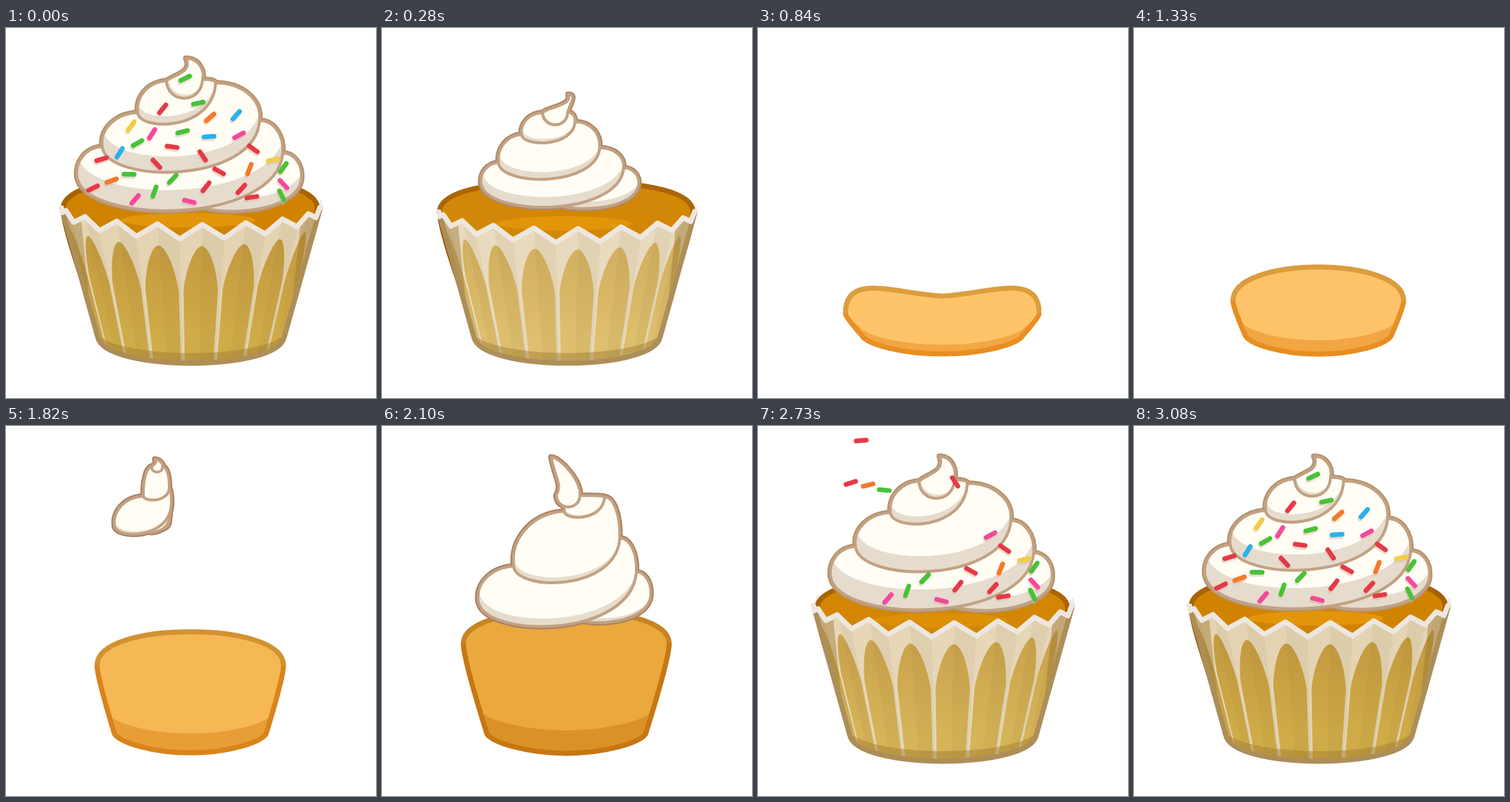
Animation of 512 by 512 pixels, one loop 3.15 s. Source, as an HTML page with a canvas:

```html
<!DOCTYPE html>
<html lang="en">
<head>
<meta charset="utf-8">
<title>Cupcake</title>
<style>
html, body { margin: 0; width: 100%; height: 100%; overflow: hidden; background: #fff; }
canvas { display: block; width: 100vmin; height: 100vmin; }
</style>
</head>
<body>
<canvas id="stage" width="512" height="512"></canvas>
<script>
const g = document.getElementById('stage').getContext('2d');
const LOOP = 3150, STEP = 70;
const FLAT = 840; // the cake has collapsed

const lerp = (a, b, k) => a + (b - a) * k;
const clamp = k => Math.max(0, Math.min(1, k));
const smooth = k => (k = clamp(k), k * k * (3 - 2 * k));
const easeOut = k => 1 - (1 - clamp(k)) ** 2;
const random = n => { const v = Math.sin(n * 12.9898) * 43758.5453; return v - Math.floor(v); };

function mix(a, b, k) {
  const ch = (c, i) => parseInt(c.slice(1 + 2 * i, 3 + 2 * i), 16);
  return 'rgb(' + [0, 1, 2].map(i => Math.round(lerp(ch(a, i), ch(b, i), k))).join() + ')';
}

/* ---------- motion of the cake ---------- */
// 1 is full size, 0 is flat dough
const rise = t => t < FLAT ? 1 - clamp(t / 800) ** 3.3 : smooth((t - 900) / 2000);

// jelly wobble: -1 tall and narrow, 1 wide and dented
const wobble = t => Math.cos(Math.PI * (t - FLAT) / 350) *
  (t < FLAT ? Math.min(1, t / 490) : Math.exp((FLAT - t) / 250));

/* ---------- cake ---------- */
function cakeShape(t) {
  const r = rise(t), q = wobble(t), sy = 395 - 145 * r;
  return {
    cx: 255, sy,
    tw: 118 + 58 * r * r + 16 * q,
    c1: sy - 32 - 25 * q * q,
    c2: sy - 46 + 18 * q,
    ty: sy - 46 + 22 * q,
    bw: 101 + 21 * r * r + 10 * q,
    by: 426, bc: 451 + 3 * r
  };
}

function cakePath({ cx, sy, tw, c1, c2, ty, bw, by, bc }) {
  const side = bw + (tw - bw) * .3, sideY = lerp(sy, by, .75), bend = sy + (by - sy) * .15;
  g.beginPath();
  g.moveTo(cx - tw, sy);
  g.bezierCurveTo(cx - tw, c1, cx - tw / 2, c2, cx, ty);
  g.bezierCurveTo(cx + tw / 2, c2, cx + tw, c1, cx + tw, sy);
  g.bezierCurveTo(cx + tw, bend, cx + side, sideY, cx + bw, by);
  g.bezierCurveTo(cx + bw - 8, by + 12, cx + bw / 2, bc, cx, bc);
  g.bezierCurveTo(cx - bw / 2, bc, cx - bw + 8, by + 12, cx - bw, by);
  g.bezierCurveTo(cx - side, sideY, cx - tw, bend, cx - tw, sy);
  g.closePath();
}

function drawCake(t) {
  const s = cakeShape(t), bake = rise(t) ** 2, band = (s.bc - s.ty) * .16;
  g.save();
  cakePath(s);
  g.fillStyle = mix('#f3a744', '#b87500', bake);
  g.fill();
  g.clip();
  cakePath({ ...s, bw: s.bw + band * .3, by: s.by - band, bc: s.bc - band });
  g.fillStyle = mix('#ffc469', '#d08300', bake);
  g.fill();
  g.globalAlpha = t < FLAT ? clamp((630 - t) / 180) : clamp((t - 2600) / 200);
  g.fillStyle = '#e29508';
  g.beginPath();
  g.ellipse(s.cx - 3, s.sy + 16, s.tw * .53, 10, 0, 0, 7);
  g.fill();
  g.restore();

  const grad = g.createLinearGradient(0, s.ty, 0, s.bc), cut = clamp((s.sy - s.ty) / (s.bc - s.ty));
  grad.addColorStop(cut, mix('#dc9d3e', '#a86200', bake));
  grad.addColorStop(cut, mix('#e88f22', '#985600', bake));
  g.strokeStyle = grad;
  g.lineWidth = 7;
  cakePath(s);
  g.stroke();
}

/* ---------- paper cup ---------- */
function cupShape(t) {
  const down = t < FLAT;
  const h = down ? rise(t) : smooth((t - 2240) / 500);
  const bw = 122 + 7 * h + (down ? 10 * Math.min(0, wobble(t)) : 0);
  return {
    cx: 256, h, bw,
    rw: bw + 50 * h,
    ry: lerp(428, 249, h), drop: 24 + 9 * h,
    by: 428, foot: 30 + 6 * h,
    alpha: down ? clamp((700 - t) / 210) : clamp((t - 2240) / 100)
  };
}

// point on the cup wall: angle in degrees, v from rim to foot
function wall(c, deg, v, lift = 0) {
  const a = deg * Math.PI / 180;
  return [c.cx + lerp(c.rw, c.bw, v) * Math.sin(a),
          lerp(c.ry, c.by, v) + lerp(c.drop, c.foot, v) * Math.cos(a) + lift];
}

function rimPath(c) {
  g.lineTo(...wall(c, -90, 0));
  for (let j = -9; j <= 8; j++) {
    const a = 5 + 10 * j, amp = c.h * (3 + 7 * Math.cos(a * Math.PI / 180));
    g.lineTo(...wall(c, a, 0, j % 2 ? amp : -amp));
  }
  g.lineTo(...wall(c, 90, 0));
}

function footPath({ cx, bw, by, foot }) {
  g.lineTo(cx + bw, by);
  g.bezierCurveTo(cx + bw * .92, by + foot * 1.33, cx - bw * .92, by + foot * 1.33, cx - bw, by);
}

function drawCupBack(c) {
  g.save();
  g.globalAlpha = c.alpha;
  g.beginPath();
  rimPath({ ...c, drop: -24 });
  g.fillStyle = '#e7dfd3';
  g.strokeStyle = '#f0ebe7';
  g.lineWidth = 6;
  g.fill();
  g.stroke();
  g.restore();
}

function drawCup(c, t) {
  const pale = t < FLAT ? clamp(t / 490) : clamp((2870 - t) / 350) * .6;
  g.save();
  g.globalAlpha = c.alpha;
  g.lineJoin = 'round';

  g.save();
  g.beginPath();
  rimPath(c);
  footPath(c);
  g.closePath();
  g.fillStyle = mix('#e4d4b4', '#ebdfc5', pale);
  g.fill();
  g.clip();

  const grad = g.createLinearGradient(0, c.ry, 0, c.by);
  grad.addColorStop(.3, mix('#c49b40', '#dcbf78', pale));
  grad.addColorStop(1, mix('#d0ac48', '#e8cd8b', pale));
  for (let a = -75; a <= 85; a += 20) {
    const l = a - 8.8, r = a + 8.8;
    g.fillStyle = grad;
    g.beginPath();
    g.moveTo(...wall(c, l, 1.1));
    g.lineTo(...wall(c, l, .45));
    g.bezierCurveTo(...wall(c, l + 1.5, .26), ...wall(c, a - 3, .11), ...wall(c, a, .11));
    g.bezierCurveTo(...wall(c, a + 3, .11), ...wall(c, r - 1.5, .26), ...wall(c, r, .45));
    g.lineTo(...wall(c, r, 1.1));
    g.fill();
    // soft fold beside each pleat
    g.fillStyle = 'rgba(128,96,42,.07)';
    g.beginPath();
    g.moveTo(...wall(c, a, 0, -12));
    g.lineTo(...wall(c, a + 10, 0, 12));
    g.lineTo(...wall(c, a + 10, 1));
    g.lineTo(...wall(c, a, 1));
    g.fill();
  }
  // dark foot
  g.fillStyle = 'rgba(156,121,48,.45)';
  g.beginPath();
  g.rect(0, 0, 512, 512);
  g.moveTo(c.cx + c.rw, 0);
  footPath({ ...c, bw: c.bw + 8, by: c.by - 14 });
  g.lineTo(c.cx - c.rw, 0);
  g.fill('evenodd');
  g.restore();

  g.lineWidth = 7;
  g.strokeStyle = '#ae8e58';
  g.beginPath();
  g.moveTo(...wall(c, 90, 0));
  footPath(c);
  g.lineTo(...wall(c, -90, 0));
  g.stroke();
  g.strokeStyle = '#eee7df';
  g.beginPath();
  rimPath(c);
  g.stroke();
  g.restore();
}

/* ---------- frosting ---------- */
// the tip, then the left and right end of the seam under each tier
const FULL = [[249, 42, 249, 42], [222, 73, 272, 71], [182, 117, 290, 76],
  [133, 164, 351, 128], [98, 205, 383, 173], [240, 225, 409, 208]];
const SMALL = [[264, 129, 264, 129], [222, 150, 246, 150], [201, 170, 250, 170],
  [182, 203, 264, 194], [166, 222, 298, 209], [205, 228, 315, 222]];
const STRAND = [[206, 46, 206, 46], [201, 56, 217, 56], [190, 97, 226, 86],
  [150, 138, 229, 108], [190, 142, 227, 122], [200, 140, 226, 132]];
const SWIRL = [[234, 43, 234, 43], [241, 96, 274, 96], [252, 118, 308, 98],
  [182, 194, 329, 155], [133, 242, 352, 202], [250, 252, 372, 234]];
const LOW = FULL.map((row, n) => row.map((v, i) => i % 2
  ? 96 + .95 * (v - 76) - (n ? 0 : 22)
  : 256 + .92 * (v - 255) + (n ? 0 : 11)));

const morph = (a, b, k) => a.map((row, n) => row.map((v, i) => lerp(v, b[n][i], clamp(k))));

function frosting(t) {
  if (t < FLAT) return morph(FULL, SMALL, t / 490);
  if (t < 2100) return morph(STRAND, SWIRL, (t - 1820) / 280);
  if (t < 2520) return morph(SWIRL, LOW, (t - 2100) / 420);
  return morph(LOW, FULL, easeOut((t - 2520) / 350));
}

// sagging seam as a cubic, left to right
function seam(p, i) {
  const [lx, ly, rx, ry] = p[i], w = rx - lx;
  const low = Math.max(ly, ry) + w * (i === 1 ? .65 : .24);
  return [lx, ly, lx + w * .03, low, rx - w * .03, low, rx, ry];
}

function along(s, u) {
  const v = 1 - u;
  return [0, 1].map(i => v * v * v * s[i] + 3 * v * v * u * s[i + 2] + 3 * v * u * u * s[i + 4] + u * u * u * s[i + 6]);
}

function tierPath(p, i) {
  const [ax, ay, bx, by] = p[i - 1], [lx, ly, rx, ry] = p[i];
  const w = rx - lx, dl = ly - ay, dr = ry - by;
  g.beginPath();
  g.moveTo(ax, ay);
  if (i === 1) g.bezierCurveTo(ax + w * .18, ay + dl * .6, lx + w * .26, ly - dl * .3, lx, ly);
  else g.bezierCurveTo(lerp(ax, lx, .65), ay + dl * .04, lx + (lx - ax) * .06, ly - dl * .5, lx, ly);
  g.bezierCurveTo(...seam(p, i).slice(2));
  if (i === 1) g.bezierCurveTo(rx + w * .06, ry - dr * .38, bx + w * .38, by, bx, by);
  else g.bezierCurveTo(rx + (rx - bx) * .05, ry - dr * .6, lerp(bx, rx, .57), by, bx, by);
  g.closePath();
}

function drawFrosting(t) {
  if (t >= 700 && t < 1750) return;
  const p = frosting(t);
  const full = t < FLAT ? 1 - clamp(t / 490) : smooth((t - 2100) / 420);
  const size = t < FLAT ? clamp((700 - t) / 210) : t < 1820 ? .5 : 1;
  const [px, py] = t < FLAT ? [240, 240] : [205, 48];
  g.save();
  g.translate(px, py);
  g.scale(size, size);
  g.translate(-px, -py);
  g.lineJoin = 'round';

  g.lineWidth = 8;
  g.strokeStyle = mix('#ab815f', '#b4936a', full);
  for (let i = 5; i; i--) {
    tierPath(p, i);
    g.stroke();
  }
  g.lineWidth = 4;
  g.strokeStyle = '#c2a184';
  for (let i = 5; i; i--) {
    g.save();
    tierPath(p, i);
    g.fillStyle = '#e6dccd';
    g.fill();
    g.clip();
    g.translate(2, (p[i][0] - p[i][2]) * lerp(.05, .1, full));
    tierPath(p, i);
    g.fillStyle = '#fffdf4';
    g.fill();
    g.restore();
    tierPath(p, i);
    g.stroke();
  }
  g.restore();
}

/* ---------- flying drops ---------- */
// x, y, half length, angle
const DROPS = [[159, 82, 27, 31], [68, 136, 23, 172], [121, 181, 15, 158], [304, 118, 16, 158], [419, 164, 31, 202]];

function drawDrops(t) {
  if (t < 350 || t >= 770) return;
  const out = smooth((t - 140) / 350) + Math.max(0, t - 490) / 900;
  const size = Math.min(1, out) * clamp((770 - t) / 210);
  g.lineWidth = 5.5;
  g.strokeStyle = '#bea79b';
  g.fillStyle = '#fffcf2';
  for (const [x, y, l, a] of DROPS) {
    const w = l * .42;
    g.save();
    g.translate(lerp(245, x, out), lerp(215, y, out));
    g.rotate(a * Math.PI / 180);
    g.scale(size, size);
    g.beginPath();
    g.moveTo(l, 0);
    g.bezierCurveTo(l, -w * .5, -l, -w * 1.5, -l, 0);
    g.bezierCurveTo(-l, w * 1.2, l, w * .8, l, 0);
    g.fill();
    g.stroke();
    g.restore();
  }
}

/* ---------- sprinkles ---------- */
const COLORS = ['#e63946', '#48c238', '#f7489a', '#f5792a', '#f2cd46', '#29b2ea', '#e6dcd8'];
const PER_TIER = [1, 2, 12, 14, 4];

// scattered in three staggered rows along each tier
const sprinkles = PER_TIER.flatMap((count, n) => Array.from({ length: count }, (_, s) => {
  const id = n * 20 + s + 1, k = (s + .5) / count;
  return {
    tier: n + 1,
    u: n === 4 ? lerp(.7, .98, k) : lerp(.04, .96, k),
    v: count < 3 ? .5 : .2 + .3 * (s * 2 % 3) + .1 * (random(id) - .5),
    deg: 150 * random(id + 7) - 75,
    color: COLORS[Math.floor(7 * random(id + 3) ** 1.3)]
  };
}));

function spot(p, { tier, u, v }) {
  const a = along(seam(p, tier - 1), u), b = along(seam(p, tier), u);
  return [lerp(a[0], b[0], v), lerp(a[1], b[1], v)];
}

function bar(x, y, deg, color) {
  const a = deg * Math.PI / 180, dx = Math.cos(a) * 7, dy = Math.sin(a) * 7;
  g.strokeStyle = color;
  g.beginPath();
  g.moveTo(x - dx, y - dy);
  g.lineTo(x + dx, y + dy);
  g.stroke();
}

function drawSprinkles(t) {
  if (t >= 490 && t < 2240) return;
  g.lineCap = 'round';
  g.lineWidth = 6.5;
  const p = frosting(Math.max(t, 2520));
  for (const s of sprinkles) {
    const [ex, ey] = spot(FULL, s);
    if (t < 490) {
      const k = t / 430;
      if (!t) bar(ex - 1, ey + 3, s.deg, 'rgba(214,180,165,.45)');
      bar(ex + (ex - 220) * .8 * k, ey - 500 * k ** 1.3, s.deg + k * 160, s.color);
      continue;
    }
    // right and lower ones land first
    const late = s.tier < 4;
    const wait = Math.max(0, 2520 + (500 - ex - ey) * 2.2 + (late ? 110 : 0) - t);
    const [x, y] = spot(p, s), fall = 28 * Math.cbrt(wait) * (late ? 1.6 : 1);
    if (!wait) bar(x - 1, y + 3, s.deg, 'rgba(214,180,165,.45)');
    bar(x + wait * .045, y - fall, s.deg + wait * .06, s.color);
  }
}

function draw(now) {
  const t = Math.floor(now % LOOP / STEP) * STEP;
  const cup = cupShape(t);
  g.fillStyle = '#fff';
  g.fillRect(0, 0, 512, 512);
  if (cup.alpha && cup.h > .75) drawCupBack(cup);
  drawCake(t);
  if (cup.alpha) drawCup(cup, t);
  drawFrosting(t);
  drawDrops(t);
  drawSprinkles(t);
}

function tick() {
  draw(performance.now());
  requestAnimationFrame(tick);
}
tick();
</script>
</body>
</html>
```
